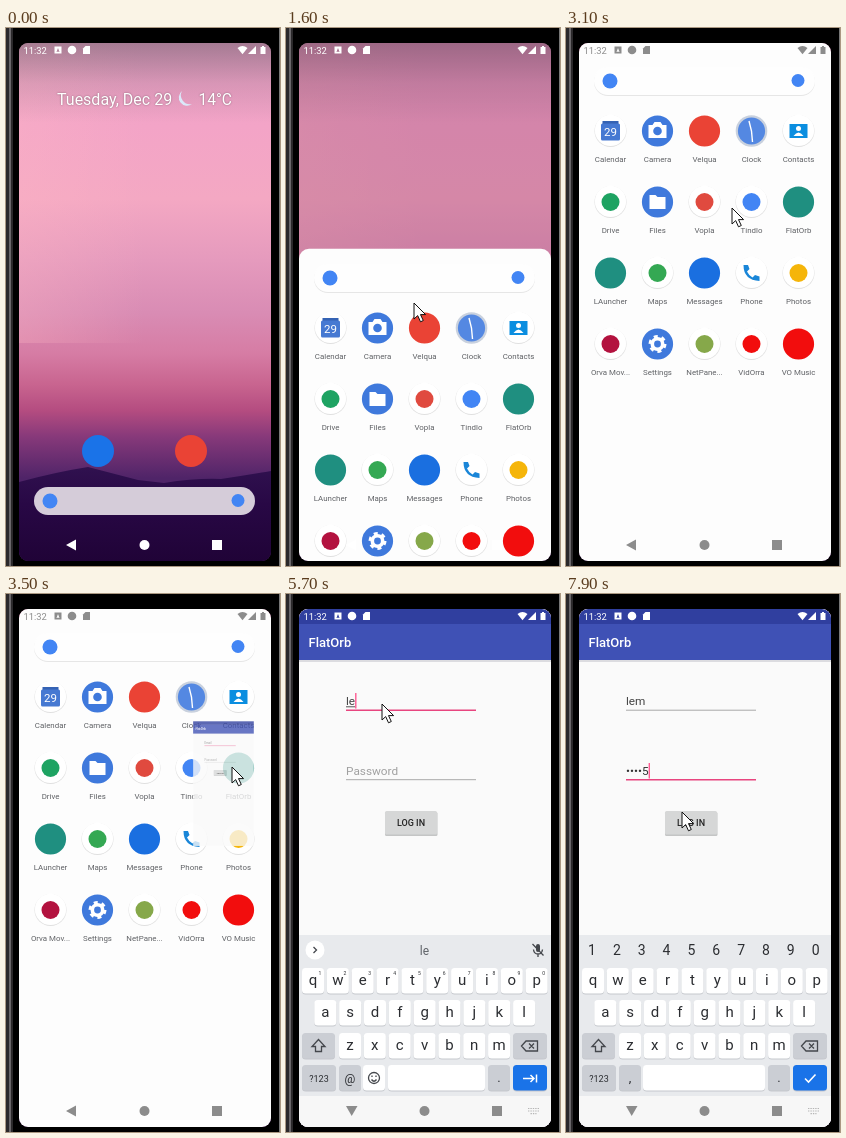
Animation, 274 px wide and 538 px high, one loop 8000 ms. Source, as an HTML page:

```html
<!DOCTYPE html>
<html lang="en">
<head>
<meta charset="utf-8">
<style>
html, body { margin: 0; width: 100%; height: 100%; overflow: hidden; background: #000; }
svg { display: block; width: 274px; height: 538px; font-family: Roboto, "Noto Sans", sans-serif; }
</style>
</head>
<body>
<svg id="stage" viewBox="0 0 274 538">
  <defs>
    <clipPath id="screen"><rect x="13" y="15" width="252" height="518" rx="9"/></clipPath>
    <linearGradient id="sky" x1="0" y1="0" x2="0" y2="1">
      <stop offset="0" stop-color="#eba0c6"/><stop offset=".16" stop-color="#f3a4c7"/>
      <stop offset=".3" stop-color="#f4a8c3"/><stop offset=".42" stop-color="#e59abd"/>
      <stop offset=".52" stop-color="#d98cb4"/><stop offset=".6" stop-color="#d67ca4"/>
      <stop offset=".66" stop-color="#c8648f"/><stop offset=".71" stop-color="#b44c80"/>
      <stop offset=".76" stop-color="#87397a"/><stop offset=".84" stop-color="#4f2468"/>
    </linearGradient>
    <linearGradient id="glow" x1="0" y1="0" x2="1" y2="0">
      <stop offset="0" stop-color="#ffb8c4" stop-opacity=".3"/><stop offset=".5" stop-color="#ffb8c4" stop-opacity="0"/>
    </linearGradient>
    <linearGradient id="hill" x1="0" y1="0" x2="0" y2="1">
      <stop offset="0" stop-color="#30114f"/><stop offset=".4" stop-color="#280845"/><stop offset="1" stop-color="#200337"/>
    </linearGradient>
    <linearGradient id="topShade" x1="0" y1="0" x2="0" y2="1">
      <stop offset="0" stop-color="#5f5560" stop-opacity=".5"/><stop offset=".5" stop-color="#5f5560" stop-opacity=".16"/>
      <stop offset="1" stop-color="#5f5560" stop-opacity="0"/>
    </linearGradient>
  </defs>

  <rect width="274" height="538"/>
  <rect width="7" height="538" fill="#2b292b"/>
  <path d="M4 0V538" stroke="#6a676a" stroke-width="2"/>
  <path d="M273.500 0V538" stroke="#777"/>

  <g clip-path="url(#screen)">
    <g id="home">
      <rect x="13" y="15" width="252" height="518" fill="url(#sky)"/>
      <rect x="13" y="15" width="252" height="300" fill="url(#glow)"/>
      <path d="M13 454 Q50 444 82 439 Q105 445 132 452 L158 455 Q190 450 215 451 Q242 447 265 443V533H13Z" fill="url(#hill)"/>
      <rect x="13" y="15" width="252" height="80" fill="url(#topShade)"/>
      <rect id="scrim" x="13" y="15" width="252" height="518" fill="#8c3c68"/>
      <g id="hotseat">
        <g fill="#fff" font-size="16" style="text-shadow:0 0 2px #0006">
          <text x="51" y="76.5">Tuesday, Dec 29</text><text x="192.5" y="76.5" font-size="15.6">14°C</text>
        </g>
        <path d="M176 63A7.500 7.500 0 1 0 186 76A9 9 0 0 1 176 63Z" fill="#dbe9fa"/>
        <circle cx="92" cy="423" r="16" fill="#1a73e8"/>
        <circle cx="185" cy="423" r="16" fill="#ea4335"/>
      </g>
    </g>
    <rect id="sheet" x="13" width="252" height="560" rx="10" fill="#fdfdfd"/>
    <g id="search">
      <g id="pillWhite">
        <rect x="28" y="40" width="221" height="28" rx="14" fill="#e6e6e6"/>
        <rect x="28" y="39" width="221" height="28" rx="14" fill="#fefefe"/>
      </g>
      <rect id="pill" x="28" y="39" width="221" height="28" rx="14" fill="#d5ccd9"/>
      <circle cx="44" cy="53" r="7.5" fill="#4285f4"/>
      <circle cx="232" cy="52.5" r="6.5" fill="#4285f4"/>
    </g>
    <g id="apps" font-size="7.9" fill="#5f6165" text-anchor="middle"></g>

    <g id="app">
      <rect x="13" y="15" width="252" height="518" fill="#fafafa"/>
      <rect x="13" y="66" width="252" height="2" fill="#dcdce0"/>
      <rect x="13" y="15" width="252" height="15" fill="#303f9f"/>
      <rect x="13" y="30" width="252" height="36" fill="#3f51b5"/>
      <text x="22.5" y="53" font-size="13" font-weight="500" fill="#fff">FlatOrb</text>
      <g font-size="11.8">
        <text id="email" x="60" y="111"/>
        <text id="password" x="60" y="181"/>
      </g>
      <path id="emailLine" d="M60 116.2H190"/>
      <path id="passLine" d="M60 185.7H190"/>
      <path id="compose" stroke="#555"/>
      <path id="caret" stroke="#ff4081" stroke-width="1.2"/>
      <rect x="99" y="218" width="52.5" height="24" rx="1.5" fill="#c4c5c5"/>
      <rect x="99" y="217" width="52" height="23.5" rx="1.5" fill="#d6d7d7"/>
      <text x="125" y="232" font-size="9" font-weight="500" text-anchor="middle" fill="#222">LOG IN</text>
    </g>
    <g id="keyboard" text-anchor="middle" fill="#2b2d31"></g>
    <rect id="navBar" x="13" y="502" width="252" height="31"/>
    <g id="nav">
      <path id="back" d="M60 517L70 511.5V522.5Z"/>
      <circle id="homeButton" cx="138.5" cy="517" r="5"/>
      <rect x="206" y="512" width="10" height="10"/>
      <path id="imeIcon" d="M242 514.5H253M242 517H253M244.5 519.7H250.5" fill="none" stroke-width="1.2" stroke-dasharray="1.4 1"/>
    </g>
    <g id="status">
      <text x="17.5" y="26" font-size="9.4">11:32</text>
      <path fill-rule="evenodd" d="M48.500 18.500h7v7h-7zM50.500 24l1.500-4 1.500 4h-1l-.5-1-.5 1z"/>
      <circle cx="66" cy="22" r="4.3"/>
      <path d="M79.500 18h4.500v8h-7v-5.500z"/>
      <path d="M231.500 20Q236.500 16 241.500 20L236.500 26.200Z"/>
      <path d="M250 18V26H242Z"/>
      <path d="M254.500 19h1.500v-1h2v1h1.500v7h-5z"/>
    </g>
  </g>
  <path id="pointer" d="M0 0V16L3.700 12.600L6.500 18.800L9.300 17.500L6.500 11.600H11.600Z" fill="#fff" stroke="#111" stroke-width="1"/>
</svg>

<script>
const LOOP = 8000;
const $ = id => document.getElementById(id);
const set = (id, attrs) => { for (const k in attrs) $(id).setAttribute(k, attrs[k]); };
const clamp = v => Math.max(0, Math.min(1, v));
const ease = v => v * v * (3 - 2 * v);
const span = (t, a, b) => clamp((t - a) / (b - a));
const show = (id, on) => set(id, { visibility: on ? 'visible' : 'hidden' });

// Interpolates rows of [time, ...values].
function track(t, rows) {
  if (t <= rows[0][0]) return rows[0].slice(1);
  const i = rows.findIndex(r => r[0] > t);
  if (i < 0) return rows[rows.length - 1].slice(1);
  const a = rows[i - 1], b = rows[i], k = ease(span(t, a[0], b[0]));
  return a.slice(1).map((v, j) => v + (b[j + 1] - v) * k);
}

// --- App grid ---
const disc = (r, fill) => `<circle r="${r}" fill="${fill}"/>`;
const plate = disc(16, '#e0e0e0') + `<circle cy="-.6" r="15.6" fill="#fff"/>`;
const dot = fill => plate + disc(9, fill);
const blue = disc(15.6, '#3f79dc');
const teal = disc(15.6, '#1f8f80');
const grid = [
  ['Calendar', plate + `<path d="M-8-10h16v4h-16z" fill="#3563b4"/><rect x="-9.500" y="-7.500" width="19" height="17" rx="1.500" fill="#4679d2"/><text y="5" font-size="11.500" fill="#fff">29</text>`],
  ['Camera', blue + `<path d="M-9-6h4l2-3h6l2 3h4v13h-18z" fill="#fff"/><circle r="4.300" fill="#3f79dc"/>`],
  ['Velqua', disc(15.6, '#ea4335')],
  ['Clock', disc(15.8, '#c9d1de') + disc(13.6, '#5488e2') + `<path d="M-2.500-10L0 0L1 11" stroke="#fff" stroke-width="1.400" fill="none"/>`],
  ['Contacts', plate + `<path d="M-9-7h18v14h-18z" fill="#0b8ee0"/><circle cy="-2.500" r="2.500" fill="#fff"/><path d="M-5 5Q0-2 5 5Z" fill="#fff"/>`],
  ['Drive', dot('#1ea362')],
  ['Files', blue + `<path d="M-8-7h6l2 2h8v12h-16z" fill="#fff"/>`],
  ['Vopla', dot('#e04a3f')],
  ['Tindlo', dot('#4285f4')],
  ['FlatOrb', teal],
  ['LAuncher', teal],
  ['Maps', dot('#34a853')],
  ['Messages', disc(15.6, '#1a6fe0')],
  ['Phone', plate + `<path d="M-8-8Q-8 7 8 8V3.500L3.500 2L1 4.500Q-3 2-4.500-1.500L-2-4L-3.500-8Z" fill="#1a86d8"/>`],
  ['Photos', dot('#f5b50a')],
  ['Orva Mov...', dot('#b3123f')],
  ['Settings', blue + `<circle r="7" fill="#fff" stroke="#fff" stroke-width="4" stroke-dasharray="3.665 3.665"/>` + disc(3.4, '#3f79dc')],
  ['NetPane...', dot('#86a84a')],
  ['VidOrra', dot('#f20d0d')],
  ['VO Music', disc(15.6, '#f20d0d')]
];
$('apps').innerHTML = grid.map(([label, icon], i) =>
  `<g transform="translate(${44.5 + i % 5 * 47} ${103 + Math.floor(i / 5) * 71})">${icon}<text y="30.500">${label}</text></g>`).join('');

// --- Keyboard ---
const key = (x, y, w, fill = '#fff') =>
  `<rect x="${x}" y="${y + 1}" width="${w}" height="25.500" rx="3.500" fill="#c5c8cd"/><rect x="${x}" y="${y}" width="${w}" height="25.500" rx="3.500" fill="${fill}"/>`;
const label = (x, y, s, size) => `<text x="${x}" y="${y}" font-size="${size}">${s}</text>`;
const letters = (row, x, y) => [...row].map((c, i) =>
  key(x + i * 24.85 - 11, y, 22) + label(x + i * 24.85, y + 17, c, 15)).join('');
const digits = (x, y, size) => [...'1234567890'].map((c, i) => label(x + i * 24.85, y, c, size)).join('');
const grey = '#cbced4', stroke = 'fill="none" stroke="#44474c" stroke-width="1.3"';
$('keyboard').innerHTML = `
  <rect x="13" y="341" width="252" height="192" fill="#e8eaed"/>
  ${letters('qwertyuiop', 27, 374)}${letters('asdfghjkl', 39.3, 406)}${letters('zxcvbnm', 64, 439)}
  ${key(16, 439, 33, grey)}${key(227, 439, 34, grey)}
  <path d="M32.500 445.500L26 452.500H29.500V457.500H35.500V452.500H39Z" ${stroke}/>
  <path d="M235.500 452L240 447H251.500V457H240ZM243 449.500L248 454.500M248 449.500L243 454.500" ${stroke}/>
  ${key(16, 471, 34, grey)}${label(33, 487.5, '?123', 9)}
  ${key(53, 471, 22, grey)}${key(202, 471, 22, grey)}${label(213, 488, '.', 13)}
  ${key(227, 471, 34, '#1a73e8')}
  <g id="mailKeys">
    <circle cx="29" cy="356" r="9.500" fill="#fff"/><path d="M27.500 353L30.500 356L27.500 359" ${stroke}/>
    <text id="hint" x="138.500" y="360.500" font-size="12" fill="#5f6368"/>
    <path d="M250 352a2 2 0 0 1 4 0v4a2 2 0 0 1-4 0z" fill="#44474c"/>
    <path d="M247.500 355.500Q248 360 252 360T256.500 355.500M252 360V363M246.500 350L257.500 361.500" ${stroke}/>
    ${digits(34, 381, 5)}
    ${label(64, 489, '@', 12)}${key(77, 471, 22)}${key(102, 471, 97)}
    <circle cx="88" cy="484" r="5.500" ${stroke}/><path d="M85.500 485.500Q88 489 90.500 485.500M86 481.500V483M90 481.500V483" ${stroke}/>
    <path d="M237 484.500H248M244.500 481L248 484.500L244.500 488M250.500 480.500V488.500" fill="none" stroke="#fff" stroke-width="1.500"/>
  </g>
  <g id="passKeys">
    ${digits(26, 361, 14)}${label(64, 488, ',', 13)}${key(77, 471, 122)}
    <path d="M239 484.500L242.500 488L249.500 480.500" fill="none" stroke="#fff" stroke-width="1.600"/>
  </g>`;

// --- Timeline ---
const pointerPath = [
  [500, 128, 545], [1000, 128, 498], [1100, 128, 498], [1600, 128, 275], [1800, 128, 280],
  [2600, 128, 280], [3100, 166, 180], [3400, 226, 173], [3800, 226, 173], [4200, 96, 110],
  [7200, 96, 110], [7800, 116, 218]
];
const typed = (t, word, times) => word.slice(0, times.filter(x => t >= x).length);
const USER = 'lem', PASS = '12345';

// Returns how far the drawer is open, 0 to 1.
function drawDrawer(t) {
  const [, y] = track(t, pointerPath);
  const settle = span(t, 1600, 1800);
  const dy = t < 1100 ? 420 : t <= 1600 ? 420 - (498 - y) : 197 * (1 - settle) ** 2;
  const p = 1 - dy / 420, fade = clamp(p * 4);
  set('scrim', { opacity: clamp(p * 2) * .3 });
  set('hotseat', { opacity: 1 - fade });
  set('sheet', { y: 14 + dy * 1.05, opacity: clamp(p * 5) });
  set('search', { transform: `translate(0 ${dy})` });
  set('pill', { opacity: 1 - fade });
  set('pillWhite', { opacity: fade });
  set('apps', { transform: `translate(0 ${dy})`, opacity: clamp((p - .12) * 4) });
  show('homeButton', p < .1 || p > .85);
  return p;
}

function drawForm(t) {
  const user = typed(t, USER, [5500, 5700, 6000]);
  const pass = typed(t, PASS, [6700, 7000, 7300, 7500, 7700]);
  const onPass = t >= 6400;
  const masked = pass && '•'.repeat(pass.length - 1) + pass.slice(-1);
  $('email').textContent = user || 'Email';
  $('password').textContent = masked || 'Password';
  set('email', { fill: user ? '#444' : '#858585' });
  set('password', { fill: masked ? '#333' : '#a0a0a0' });
  const line = on => ({ stroke: on ? '#e8457f' : '#a9a9a9', 'stroke-width': on ? 1.6 : 1 });
  set('emailLine', line(!onPass));
  set('passLine', line(onPass));

  const value = onPass ? masked : user;
  const width = value ? $(onPass ? 'password' : 'email').getComputedTextLength() : 0;
  const top = onPass ? 169 : 99;
  set('caret', { d: `M${60.7 + width} ${top}v15.500` });
  show('caret', t >= 4500 && (value || t % 1000 < 500));
  set('compose', { d: `M60 112.800h${width}` });
  show('compose', user && !onPass);

  $('hint').textContent = user;
  show('mailKeys', !onPass);
  show('passKeys', onPass);
}

function draw(t) {
  const p = drawDrawer(t);
  const launch = ease(span(t, 3400, 3800));
  const opened = launch > .9;
  set('app', {
    display: launch > 0 ? 'inline' : 'none',
    transform: `translate(${232 - 93 * launch} ${174 + 100 * launch}) scale(${.1 + .9 * launch}) translate(-139 -274)`,
    opacity: clamp(launch * 5)
  });
  if (launch > 0) drawForm(t);

  const rise = ease(span(t, 4300, 4600));
  const typing = rise > 0;
  set('keyboard', { transform: `translate(0 ${192 * (1 - rise)})`, display: typing ? 'inline' : 'none' });
  show('navBar', opened);
  set('navBar', { fill: typing ? '#f7f7f7' : '#000' });

  // System icons darken gradually once the white sheet is behind them.
  const shade = Math.round(255 - 115 * span(t, 1650, 1850));
  const dark = `rgb(${shade},${shade},${shade})`;
  set('nav', { fill: p > .85 ? dark : '#fff' });
  set('status', { fill: p > .85 && !opened ? dark : '#fff' });
  set('back', { d: typing ? 'M60 512H71.500L65.700 522Z' : 'M60 517L70 511.500V522.500Z' });
  show('imeIcon', t >= 4200);
  set('imeIcon', { stroke: typing ? '#b5b5b5' : '#aaa' });

  const [x, y] = track(t, pointerPath);
  set('pointer', { transform: `translate(${x} ${y})` });
}

const start = performance.now();
function tick() {
  const t = (performance.now() - start) % LOOP;
  draw(Math.floor(t / 100) * 100);
  requestAnimationFrame(tick);
}
tick();
</script>
</body>
</html>
```
